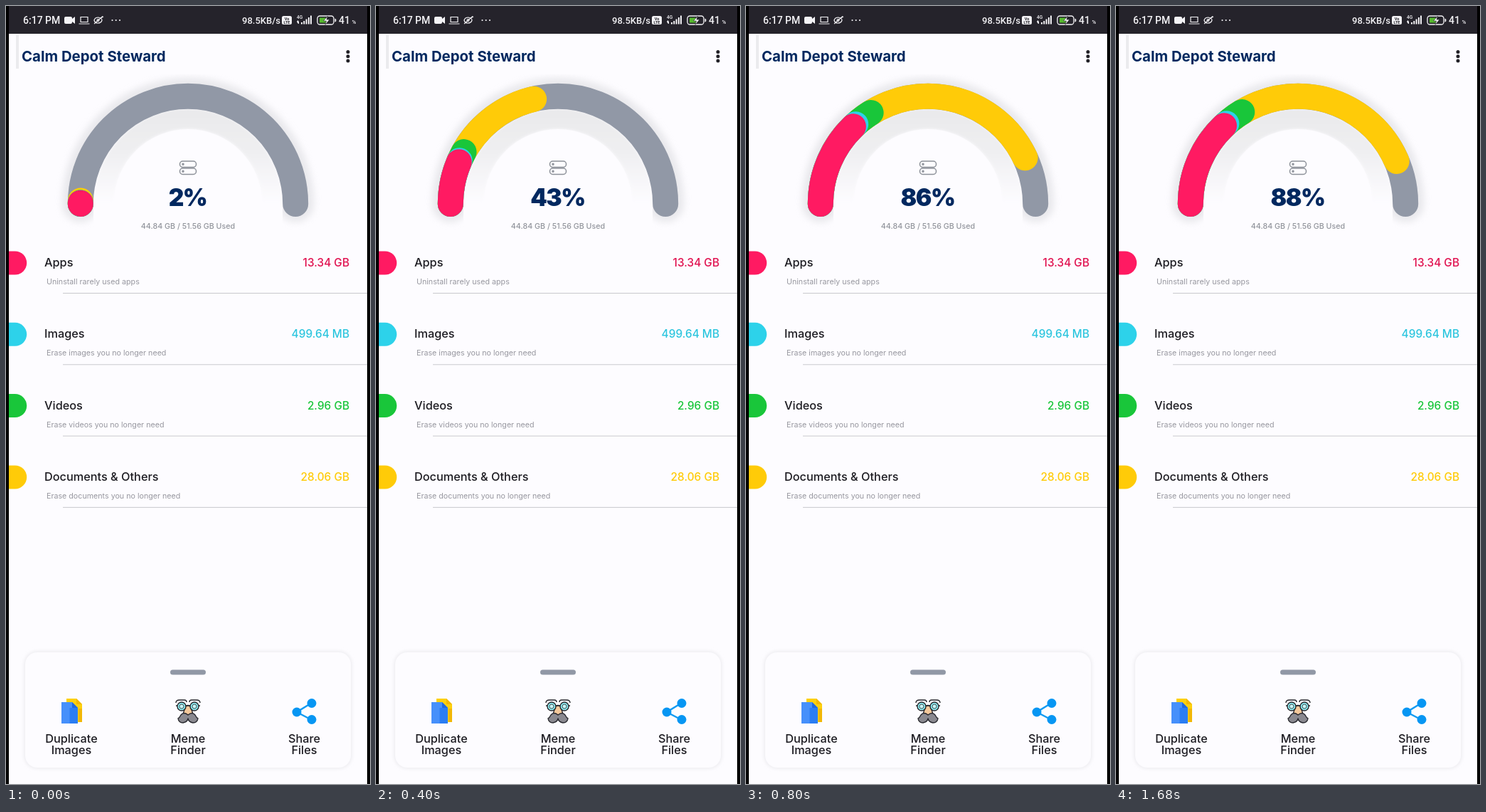
These frames come from a looping animation (512x1093 px, 1720 ms). An HTML page:

```html
<!DOCTYPE html>
<html lang="en">
<head>
<meta charset="utf-8">
<title>Storage gauge</title>
<style>
  html, body { margin: 0; height: 100%; overflow: hidden; background: #000; }
  svg { display: block; width: 100%; height: 100%; font-family: Inter, sans-serif; }
  .status { font-family: Roboto, sans-serif; font-weight: 500; fill: #f4f3f6; }
  .arc { fill: none; stroke-width: 36; stroke-linecap: round; }
  .label { font-size: 16.3px; font-weight: 500; fill: #1d1c22; }
  .value { font-size: 15.4px; font-weight: 500; text-anchor: end; }
  .hint { font-size: 10.7px; fill: #97979f; }
  .mid { text-anchor: middle; }
</style>
</head>
<body>
<svg viewBox="0 0 512 1093">
  <defs>
    <filter id="blur" x="-20%" y="-20%" width="140%" height="150%"><feGaussianBlur stdDeviation="5"/></filter>
    <filter id="soft" x="-20%" y="-20%" width="140%" height="140%"><feGaussianBlur stdDeviation="2"/></filter>
    <linearGradient id="fade" x2="0" y2="1">
      <stop stop-color="#e9e9eb"/><stop offset=".45" stop-color="#efeff1"/><stop offset="1" stop-color="#fdfcff"/>
    </linearGradient>
  </defs>
  <path fill="#fdfcff" d="M4 39H508V1093H4z"/>
  <path fill="#25232b" d="M4 0H508V39H4z"/>
  <path fill="#ebebee" d="M14 41h4v47h-4z"/>

  <!-- status bar -->
  <g class="status">
    <text x="24" y="25" font-size="14">6:17 PM</text>
    <path d="M84 15h7q2 0 2 2v1l4-3v10l-4-3v1q0 2-2 2h-7q-2 0-2-2v-6q0-2 2-2z"/>
    <g fill="none" stroke="#f4f3f6" stroke-width="1.2">
      <path d="M105 15.500h10v7h-10zM102.500 25h15"/>
      <path d="M124 20q1-4 6-4 5 1 5 4-1 4-6 4-4 0-5-4zM124 25L136 14.500M133 17l4-2"/>
      <circle cx="129.500" cy="20" r="1.500"/>
    </g>
    <circle cx="149.500" cy="20" r="1.100"/><circle cx="154.700" cy="20" r="1.100"/><circle cx="160" cy="20" r="1.100"/>
    <text x="332" y="25" font-size="13">98.5KB/s</text>
    <rect x="388" y="14" width="14" height="12" rx="2.500"/>
    <g font-size="5.500" font-weight="700" fill="#25232b" class="mid"><text x="395" y="19.500">Vo</text><text x="395" y="25">LTE</text></g>
    <text x="409" y="18" font-size="6.500">4G</text>
    <path d="M409 22l1.500-2 1.500 2v3h-1zM415 23h2v2.500h-2zM418.300 21h2v4.500h-2zM421.600 18.500h2v7h-2zM424.900 16h2v9.500h-2zM428 13.500h2v12h-2z"/>
    <rect x="438" y="14" width="23" height="12" rx="3.500" fill="none" stroke="#f4f3f6" stroke-width="1.300"/>
    <path d="M462.500 17.500q2 0 2 2.500t-2 2.500z"/>
    <path fill="#55b92e" d="M441 16.500h9v7h-9z"/>
    <path stroke="#25232b" stroke-width=".6" d="M452.500 14l-6 7h4l-1.500 5.500 6-7.500h-4z"/>
    <text x="468" y="25" font-size="14">41</text>
    <text x="486.500" y="25" font-size="8">%</text>
  </g>

  <text x="22" y="78" font-size="20.400" font-weight="700" fill="#00285f">Calm Depot Steward</text>
  <g fill="#222127"><circle cx="481" cy="64.500" r="2.500"/><circle cx="481" cy="70.700" r="2.500"/><circle cx="481" cy="77" r="2.500"/></g>

  <!-- gauge -->
  <path class="arc" d="M104.500 278a151.500 151.500 0 0 1 303 0" stroke="#dfdfe3" style="stroke-width:52" opacity=".65" filter="url(#blur)"/>
  <path fill="#fdfcff" d="M123 277a133 133 0 0 1 266 0v36H123z"/>
  <path fill="url(#fade)" filter="url(#soft)" d="M123 277a133 133 0 0 1 266 0H360a104 104 0 0 0-208 0z"/>
  <path fill="#fdfcff" d="M152 277a104 104 0 0 1 208 0v20H152z"/>
  <g id="gauge"></g>
  <g fill="none" stroke="#8c9098" stroke-width="1.500">
    <rect x="244.500" y="218" width="23" height="8.500" rx="4"/><rect x="244.500" y="228" width="23" height="8.500" rx="4"/>
    <circle cx="249" cy="222.300" r="1"/><circle cx="249" cy="232.300" r="1"/>
  </g>
  <text id="percent" class="mid" x="255.500" y="281" font-size="33.500" font-weight="900" letter-spacing="-1.500" fill="#00285f"></text>
  <text class="mid" x="256" y="313" font-size="10.700" font-weight="500" fill="#92959c">44.84 GB / 51.56 GB Used</text>

  <g id="list"></g>

  <!-- tools -->
  <rect x="25" y="906" width="462" height="166" rx="19" fill="#efeef2" filter="url(#soft)"/>
  <rect x="27" y="908" width="458" height="162" rx="17" fill="#fdfcff"/>
  <rect x="231" y="932.500" width="50" height="7" rx="3.500" fill="#9198a6"/>

  <path fill="#fdd00c" d="M85 973h14l8 8v25H85z"/>
  <path fill="#f2b707" d="M99 973l8 8h-8zM102 987h5v19h-5z"/>
  <path fill="#4690fb" d="M78 978h15l8 8v22H78z"/>
  <path fill="#2a7df3" d="M89.500 986H101v22H89.500z"/>
  <path fill="#2068dc" d="M93 978l8 8h-8z"/>

  <g stroke="#27272d" stroke-width="1.400" stroke-linejoin="round">
    <path fill="#f4c89b" d="M253 983h6l3.500 10q-1 4-6.500 4t-6.500-4z"/>
    <path fill="#8a8990" d="M256 996q-6-5-10 0-2 4-4 5 1 6 7 6 6-1 7-6 1 5 7 6 6 0 7-6-2-1-4-5-4-5-10 0z"/>
    <path fill="none" d="M239 979q0-4 5-4h7q3 0 3 3M273 979q0-4-5-4h-7q-3 0-3 3M239 983h3M270 983h3M252 984q4-3 8 0"/>
    <circle cx="247" cy="984" r="6" fill="#8ce9ee"/><circle cx="265" cy="984" r="6" fill="#8ce9ee"/>
    <circle cx="247" cy="984" r="3" fill="#c9f6f7" stroke-width=".8"/><circle cx="265" cy="984" r="3" fill="#c9f6f7" stroke-width=".8"/>
  </g>

  <path d="M430 979L409 992l21 11" fill="none" stroke="#149bf2" stroke-width="2.500"/>
  <g fill="#0796f3"><circle cx="430" cy="979.500" r="6.500"/><circle cx="409" cy="992" r="6.500"/><circle cx="430" cy="1002.500" r="6.500"/></g>
  <g id="tools" class="label mid"></g>
</svg>
<script>
const PERIOD = 1720, STEP = 40, RISE = 1120, LEAD = 157, TOTAL = 51.56;
const $ = id => document.getElementById(id);

const items = [
  { name: 'Apps', hint: 'Uninstall rarely used apps', size: '13.34 GB', gb: 13.34, color: '#ff1a62', ink: '#e0104f' },
  { name: 'Images', hint: 'Erase images you no longer need', size: '499.64 MB', gb: 0.488, color: '#2dd2ea', ink: '#2bc5de' },
  { name: 'Videos', hint: 'Erase videos you no longer need', size: '2.96 GB', gb: 2.96, color: '#19c63a', ink: '#19c63a' },
  { name: 'Documents &amp; Others', hint: 'Erase documents you no longer need', size: '28.06 GB', gb: 28.06, color: '#ffcb08', ink: '#ffcb08' },
];

$('list').innerHTML = items.map((item, i) => `
  <g transform="translate(0 ${i * 100.3})">
    <path fill="${item.color}" d="M4 344.500h8.700a16.500 16.500 0 0 1 0 33H4z"/>
    <text class="label" x="54" y="366">${item.name}</text>
    <text class="hint" x="57" y="391">${item.hint}</text>
    <text class="value" x="483" y="366" fill="${item.ink}">${item.size}</text>
    <path stroke="#c9c9cd" d="M80 403.500H508"/>
  </g>`).join('');

$('tools').innerHTML = [[92, 'Duplicate', 'Images'], [256, 'Meme', 'Finder'], [419.5, 'Share', 'Files']]
  .map(([x, top, bottom]) => `<text x="${x}" y="1035">${top}</text><text x="${x}" y="1050.500">${bottom}</text>`).join('');

// Each arc starts at zero and lies under the shorter ones.
let sum = 0;
const ends = items.map(item => sum += item.gb / TOTAL);
const arc = color => `<path class="arc" pathLength="1" stroke="${color}" d="M104.800 278a151.200 151.200 0 0 1 302.400 0"/>`;
$('gauge').innerHTML = arc('#9198a6') + items.map(item => arc(item.color)).reverse().join('');
const arcs = [...$('gauge').children].slice(1).reverse();

const easeInOut = x => x < 0.5 ? 4 * x ** 3 : 1 - 4 * (1 - x) ** 3;

function draw(time) {
  const t = Math.floor(time % PERIOD / STEP) * STEP;
  const progress = easeInOut(Math.min(1, (t + LEAD) / RISE));
  arcs.forEach((path, i) => path.setAttribute('stroke-dasharray', `${ends[i] * progress} 2`));
  $('percent').textContent = Math.floor(87 * progress + 1.05) + '%';
}

let start;
function tick(now) {
  start ??= now;
  draw(now - start);
  requestAnimationFrame(tick);
}
draw(0);
requestAnimationFrame(tick);
</script>
</body>
</html>
```
